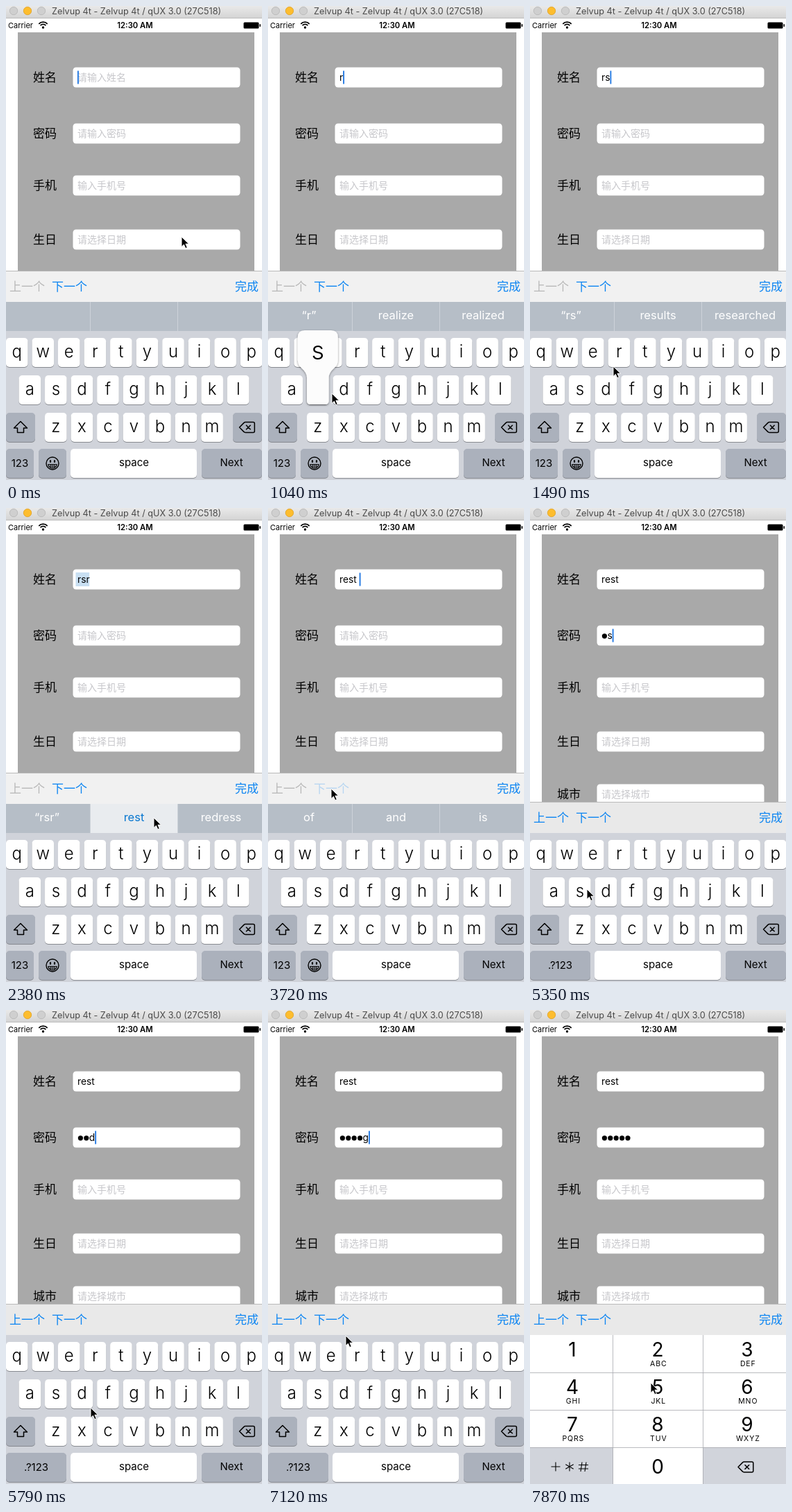
Write an HTML page that moves like this. It is 369 by 684 pixels and loops after 8 s.

```html
<!DOCTYPE html>
<html lang="zh-CN">
<head>
<meta charset="utf-8">
<title>Form keyboard</title>
<style>
html, body { margin: 0; width: 100%; height: 100%; overflow: hidden; background: #fff; }
svg { display: block; width: 369px; height: 684px; }
text { font-family: Inter, "Noto Sans CJK SC", "Noto Sans CJK", sans-serif; fill: #000; }
.mid { text-anchor: middle; }
.label { font-size: 17px; }
.hint { font-size: 14px; fill: #c7c7cb; }
.typed { font-size: 13.8px; }
.bar { font-size: 17px; fill: #0a84f2; }
.word { font-size: 16.5px; fill: #fff; }
.letter { font-size: 24px; font-weight: 300; }
.big { font-size: 36px; font-weight: 300; }
.small { font-size: 15px; }
.digit { font-size: 28px; }
.abc { font-size: 10.5px; letter-spacing: .9px; }
.line { fill: none; stroke: #000; stroke-width: 1.5; stroke-linejoin: round; }
</style>
</head>
<body>
<svg id="stage" viewBox="0 0 369 684"></svg>
<script>
const LOOP = 8000, STEP = 148.6;
const stage = document.getElementById('stage');

const rect = (x, y, w, h, fill, r = 0) =>
  `<rect x="${x}" y="${y}" width="${w}" height="${h}" rx="${r}" fill="${fill}"/>`;
const text = (x, y, s, cls, more = '') => `<text x="${x}" y="${y}" class="${cls}" ${more}>${s}</text>`;
const path = (d, cls = 'line', more = '') => `<path d="${d}" class="${cls}" ${more}/>`;
const circle = (x, y, r, fill, more = '') => `<circle cx="${x}" cy="${y}" r="${r}" fill="${fill}" ${more}/>`;
const group = (id, body) => `<g id="${id}">${body}</g>`;

function header() {
  const light = (x, fill, edge) => circle(x, 7, 5.7, fill, `stroke="${edge}" stroke-width=".8"`);
  const arc = (r) => {
    const d = r * .72;
    return path(`M${53.5 - d} ${32 - d}A${r} ${r} 0 0 1 ${53.5 + d} ${32 - d}`, 'line', 'style="stroke-width:1.8"');
  };
  return rect(0, 0, 369, 18, 'url(#chrome)') + rect(0, 17, 369, 1, '#bdbdbd') +
    light(11, '#cfcfcf', '#b5b5b5') + light(31, '#fdbd2e', '#dfa023') + light(51, '#cfcfcf', '#b5b5b5') +
    text(66, 12, 'Zelvup 4t - Zelvup 4t / qUX 3.0 (27C518)', '', 'style="font-size:12.7px;fill:#4a4a4a"') +
    text(3, 32, 'Carrier', '', 'style="font-size:11px"') +
    arc(8.6) + arc(5.4) + circle(53.5, 31, 1.7, '#000') +
    text(186, 32, '12:30 AM', 'mid', 'style="font-size:11.3px;font-weight:600"') +
    rect(342.5, 23.5, 22, 9, '#000', 1.5) + rect(365.5, 26, 1.5, 4, '#000', .7);
}

const rows = [
  [88.5, '姓名', '请输入姓名'], [169.5, '密码', '请输入密码'], [244.5, '手机', '输入手机号'],
  [322.5, '生日', '请选择日期'], [398.5, '城市', '请选择城市']
];
const form = () => rect(17, 38, 341, 646, '#a9a9a9') + rows.map(([y, label, hint], i) =>
  text(39, y + 20.3, label, 'label') + rect(96.5, y, 241, 29, '#fff', 4.5) +
  text(103, y + 19.3, hint, 'hint', `id="hint${i}"`)).join('');

const toolbar = () => `<rect id="tint" y="382" width="369" height="46"/>` +
  rect(0, 382, 369, 1, '#b9b9b9') +
  text(5, 411, '上一个', 'bar', 'id="prev"') + text(66, 411, '下一个', 'bar', 'id="next"') +
  text(364, 411, '完成', 'bar', 'text-anchor="end"');

const wordBar = () => rect(0, 427, 369, 42, '#b6bec7') +
  `<rect id="pick" x="121" y="427" width="127" height="42" fill="#e9ecef"/>` +
  rect(121, 427, 1, 42, '#cdd3da') + rect(247, 427, 1, 42, '#cdd3da') +
  [59, 184.5, 310].map((x, i) => text(x, 452, '', 'word mid', `id="word${i}"`)).join('');

const key = (x, y, w, fill = '#fff') => rect(x, y + 1, w, 42, '#878a90', 5) + rect(x, y, w, 42, fill, 5);
const GREY = '#abb1bc';
const eraser = (x, y) => path(`M${x - 11} ${y}l6.5 -6.6q.8 -.9 2 -.9h11.3q2 0 2 2v11q0 2 -2 2h-11.3q-1.2 0 -2 -.9z` +
  `M${x - 1.5} ${y - 3.3}l6.6 6.6m0 -6.6l-6.6 6.6`);

const keyAt = {};
function letters() {
  return [['qwertyuiop', 15.7, 479], ['asdfghjkl', 34.3, 533], ['zxcvbnm', 71.8, 587]]
    .map(([chars, x0, y]) => [...chars].map((c, i) => {
      const x = x0 + 37.55 * i;
      keyAt[c] = [x, y];
      return key(x - 15.8, y, 31.6) + text(x, y + 27.7, c, 'letter mid');
    }).join('')).join('');
}

const grin = circle(67, 660, 9, 'none', 'stroke="#000" stroke-width="1.4"') +
  `<ellipse cx="64" cy="657" rx="1.2" ry="1.9"/><ellipse cx="70" cy="657" rx="1.2" ry="1.9"/>` +
  path('M60.8 661.5h12.4q-1 5.3 -6.2 5.3t-6.2 -5.3z', 'line', 'style="stroke-width:1.2"') +
  path('M61.5 664h11M64.5 661.5v5M67 661.5v5M69.500 661.5v5', 'line', 'style="stroke-width:.8"');

const keyboard = () => rect(0, 469, 369, 215, '#d0d3da') + letters() +
  key(0, 587, 42, GREY) + path('M21 599.500l9.500 9.500h-5v6.500h-9v-6.500h-5z') +
  key(327, 587, 42, GREY) + eraser(347.5, 608) +
  group('plain', key(0, 639, 40, GREY) + text(20, 665, '123', 'small mid') + key(47, 639, 40, GREY) + grin) +
  group('secure', key(0, 639, 87, GREY) + text(43.5, 665, '.?123', 'small mid')) +
  key(93, 639, 182) + text(184.5, 664, 'space', 'small mid') +
  key(282, 639, 87, GREY) + text(325, 664, 'Next', 'small mid');

function numpad() {
  const names = ['', 'ABC', 'DEF', 'GHI', 'JKL', 'MNO', 'PQRS', 'TUV', 'WXYZ'];
  const digit = (n, x, y) => text(x, y, n, 'digit mid');
  let out = rect(0, 469, 369, 215, '#fff') + rect(0, 631, 120, 53, '#d1d4db') + rect(249, 631, 120, 53, '#d1d4db');
  names.forEach((s, i) => {
    const x = [61, 184, 313][i % 3], y = 499.5 + 54 * Math.floor(i / 3);
    out += digit(i + 1, x, y) + text(x + 1.3, y + 14.5, s, 'abc mid');
  });
  for (const y of [523, 577, 631]) out += rect(0, y, 369, .8, '#a9abb0');
  for (const x of [119, 249]) out += rect(x, 469, .8, 215, '#a9abb0');
  return out + digit(0, 184, 668.5) + eraser(311, 659.5) +
    path('M30.500 659h13M37 652.500v13M57 652.500v13M51.300 655.700l11.400 6.600M62.700 655.700l-11.400 6.600' +
      'M70 656.500h14M70 662h14M75 652.500l-2 13.500M81 652.500l-2 13.500', 'line', 'style="stroke-width:1.1"');
}

const popup = () => path('M-19 -11h38q10 0 10 10v33q0 7 -6 12q-7 6 -7.200 13v34q0 5 -5 5h-21.600q-5 0 -5 -5v-34' +
  'q-.2 -7 -7.200 -13q-6 -5 -6 -12v-33q0 -10 10 -10z', '', 'fill="#fcfcfc" filter="url(#soft)"') +
  text(0, 31, '', 'big mid', 'id="popText"');

stage.innerHTML = `<defs>
  <linearGradient id="chrome" x2="0" y2="1"><stop stop-color="#e9e9e9"/><stop offset="1" stop-color="#d3d3d3"/></linearGradient>
  <filter id="soft" x="-20%" y="-20%" width="140%" height="140%"><feDropShadow dx="0" dy="1" stdDeviation="1.5" flood-opacity=".45"/></filter>
</defs>` +
  rect(0, 0, 369, 684, '#fff') + form() +
  `<rect id="mark" x="100.500" y="93" height="20" fill="#c8dff2"/>` +
  text(103, 107.5, '', 'typed', 'id="name"') + group('dots', '') + text(103, 188.8, '', 'typed', 'id="pass"') +
  `<rect id="caret" width="1.8" height="19" fill="#1a73e0"/>` +
  group('toolbar', toolbar()) + group('words', wordBar()) + group('keys', keyboard()) + group('numpad', numpad()) +
  header() + group('popup', popup()) +
  `<path id="mouse" d="M0 0v14.500l3.400 -3.200l2.400 5.400l2.500 -1.100l-2.400 -5.300h4.700z" stroke="#fff" stroke-width="1"/>`;

const el = {};
stage.querySelectorAll('[id]').forEach((n) => { el[n.id] = n; });
const show = (id, on) => { el[id].style.display = on ? '' : 'none'; };
const set = (id, attrs) => { for (const a in attrs) el[id].setAttribute(a, attrs[a]); };

// [step, x, y]
const track = [
  [0, 253, 333], [2, 205, 415], [3, 160, 475], [4, 133, 503], [5, 130, 505], [7, 92, 559], [8, 84, 558],
  [10, 120, 520], [11, 131, 506], [12, 131, 508], [13, 150, 508], [14, 190, 494], [15, 216, 467], [16, 213, 447],
  [18, 213, 447], [20, 170, 428], [22, 98, 408], [23, 91, 405], [26, 91, 405], [28, 92, 440], [30, 104, 482],
  [32, 109, 498], [33, 113, 500], [34, 108, 512], [36, 82, 550], [37, 84, 555], [38, 112, 568], [39, 122, 574],
  [40, 145, 586], [41, 157, 588], [42, 158, 586], [44, 196, 560], [45, 197, 556], [46, 172, 516], [47, 112, 470],
  [48, 87, 454], [49, 87, 454], [50, 94, 465], [51, 122, 492], [52, 157, 523], [53, 174, 538]
];
function mouseAt(k) {
  const i = Math.max(1, track.findIndex((p) => p[0] >= k));
  const [a, b] = [track[i - 1], track[i]];
  const f = (k - a[0]) / (b[0] - a[0]);
  return [1, 2].map((j) => a[j] + (b[j] - a[j]) * f);
}

const last = (list, k) => list.filter((e) => e[0] <= k).pop();
const names = [[0, ''], [5, 'r'], [8, 'rs'], [12, 'rsr'], [18, 'rest\u00a0']];
const hints = [
  [0, '', '', ''], [5, '“r”', 'realize', 'realized'], [8, '“rs”', 'results', 'researched'],
  [12, '“rsr”', 'rest', 'redress'], [18, 'of', 'and', 'is']
];
const passes = [[0, 0, ''], [34, 0, 'r'], [36, 1, 's'], [38, 2, 'd'], [42, 3, 'v'], [45, 4, 'g'], [49, 5, '']];
const presses = { 4: 'r', 7: 's', 11: 'r' };
const blinkOff = [3, 4, 16, 17, 21, 22, 30, 31, 32, 52, 53];

function draw(k) {
  const field = k < 26 ? 0 : k < 49 ? 1 : 2;
  const [, dots, char] = last(passes, k);
  el.name.textContent = last(names, k)[1];
  el.pass.textContent = char;
  set('pass', { x: 103 + 8.4 * dots });
  el.dots.innerHTML = Array.from({ length: dots }, (_, i) => circle(107.4 + 8.4 * i, 184.8, 3.6, '#000')).join('');
  show('hint0', k < 5);
  show('hint1', k < 34);

  const nameWidth = k < 5 ? 0 : el.name.getComputedTextLength();
  const passWidth = 8.4 * dots + (char ? el.pass.getComputedTextLength() : 0);
  set('caret', {
    x: 103 + [nameWidth, passWidth, 0][field], y: rows[field][0] + 5,
    opacity: blinkOff.includes(k) ? 0 : k === 48 ? .5 : 1
  });

  const fix = k >= 12 && k < 18;
  show('mark', fix);
  set('mark', { width: nameWidth + 2 });
  show('pick', fix);
  last(hints, k).slice(1).forEach((w, i) => { el['word' + i].textContent = w; });
  el.word1.style.fill = fix ? '#0a78d0' : '';

  show('words', field === 0);
  show('plain', field === 0);
  show('secure', field === 1);
  show('keys', field < 2);
  show('numpad', field === 2);
  set('toolbar', { transform: `translate(0 ${field ? 42 : 0})` });
  set('tint', { fill: field ? '#e9e9e9' : '#f1f1f1' });
  el.prev.style.fill = field ? '' : '#b8b8b8';
  el.next.style.opacity = k === 25 || k === 48 ? .25 : 1;

  const press = presses[k];
  show('popup', press);
  if (press) {
    set('popup', { transform: `translate(${keyAt[press][0]} ${keyAt[press][1] - 54})` });
    el.popText.textContent = press;
  }
  set('mouse', { transform: `translate(${mouseAt(k)})` });
}

let shown = -1;
function tick(now) {
  const k = Math.min(53, Math.floor((now % LOOP + 8) / STEP));
  if (k !== shown) draw(shown = k);
  requestAnimationFrame(tick);
}
draw(0);
requestAnimationFrame(tick);
</script>
</body>
</html>
```
